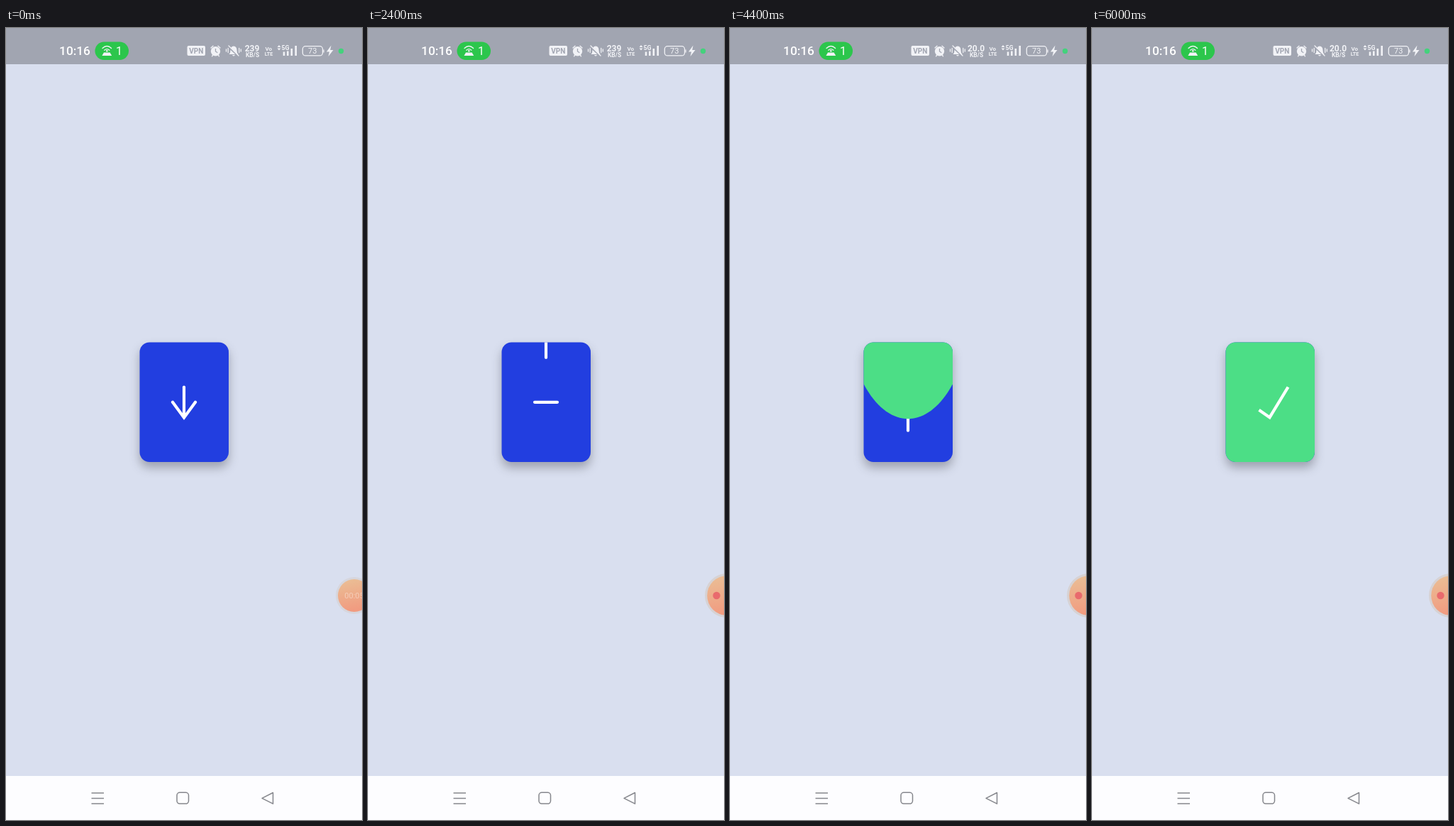
Recreate the animation shown at these times as an HTML page. Size 502 by 1115 pixels, loop 8000 ms.

```html
<!DOCTYPE html>
<html lang="en">
<head>
<meta charset="utf-8">
<title>Download button</title>
<style>
  html, body { margin: 0; width: 100%; height: 100%; overflow: hidden; background: #d9dfef; }
  svg { display: block; width: 100%; height: 100%; }
  text { font-family: Roboto, sans-serif; text-anchor: middle; }
  .line { fill: none; stroke: #fff; stroke-width: 4.2; }
  .status { fill: #f1f2f6; }
  .status .outline { fill: none; stroke: #f1f2f6; stroke-width: 1.3; stroke-linecap: round; }
  .nav { fill: none; stroke: #85868c; stroke-width: 1.5; stroke-linejoin: round; }
  #card { filter: drop-shadow(0 8px 7px rgba(30, 30, 40, .32)); }
</style>
</head>
<body>
<svg viewBox="0 0 502 1115" preserveAspectRatio="none">
  <defs>
    <clipPath id="cardClip"><rect x="188.5" y="442.5" width="125.5" height="168.5" rx="14"/></clipPath>
    <linearGradient id="peach" x1="0" y1="0" x2=".2" y2="1">
      <stop offset="0" stop-color="#eac096"/><stop offset="1" stop-color="#f19b80"/>
    </linearGradient>
  </defs>

  <rect width="502" height="1115" fill="#d9dfef"/>
  <rect width="502" height="51" fill="#a1a5b1"/>
  <rect y="1053" width="502" height="62" fill="#fdfdff"/>

  <g class="status">
    <text x="97" y="38.2" font-size="17.3" font-weight="500" fill="#fff">10:16</text>
    <rect x="125.5" y="19.5" width="47.5" height="25.5" rx="12.75" fill="#2cc64c"/>
    <path class="outline" d="M136 28.5Q142.300 22.500 148.600 28.500M138.800 31.200Q142.300 28 145.800 31.200" stroke-width="1.5"/>
    <circle cx="142.300" cy="32.300" r="1.300"/>
    <path d="M138 34.500h8.600l2.600 4.500h-13.800z"/>
    <text x="159.500" y="38" font-size="16" fill="#fff">1</text>

    <rect x="255.500" y="25" width="25.500" height="14" rx="2"/>
    <text x="268.300" y="35.600" font-size="10" font-weight="700" fill="#a1a5b1">VPN</text>

    <circle cx="295.500" cy="32.700" r="6.700"/>
    <path class="outline" d="M289 28l3-2.800M302 28l-3-2.800M291.500 38.500l-1 1.300M299.500 38.500l1 1.300" stroke-width="1.700"/>
    <path d="M295.500 29v4l2.800 1.800" fill="none" stroke="#a1a5b1" stroke-width="1.300"/>

    <path d="M314.500 37q2-1.500 2-5.500q0-5.500 4.500-6q4.500.5 4.500 6q0 4 2 5.500zM319 38h4q-2 3-4 0z"/>
    <path d="M313.500 26.500l14 13" stroke="#a1a5b1" stroke-width="2.200"/>
    <path class="outline" d="M314 25l14 14M310.500 30v3M313.200 28.500v6M328.700 28.500v6M331.300 30v3"/>

    <text id="speed" x="347" y="32.800" font-size="12" font-weight="700">239</text>
    <text x="347.500" y="41" font-size="8.500" font-weight="700">KB/S</text>
    <g font-size="8" font-weight="700">
      <text x="370.300" y="31.500">Vo</text>
      <text x="370.500" y="39.300" font-size="7.200">LTE</text>
      <text x="394" y="31.300" font-size="8.800">5G</text>
    </g>
    <path d="M382.500 27l2.500-3 2.500 3zM382.500 28.500h5l-2.500 3z"/>
    <path d="M392 33.500v5.500M397.300 32.500v6.500M402.800 29v10M408.700 25v14" stroke="#f1f2f6" stroke-width="2.600"/>
    <rect class="outline" x="418.300" y="25.700" width="28.200" height="13.200" rx="4"/>
    <path class="outline" d="M448 31v3"/>
    <text x="432.300" y="36.300" font-size="11">73</text>
    <path d="M458.500 24.500l-6.500 9h4l-1.500 6.500 7-9h-4.300z"/>
    <circle cx="472.500" cy="32.500" r="3.700" fill="#43d27c"/>
  </g>

  <g id="card">
    <rect x="188.500" y="442.500" width="125.500" height="168.500" rx="14" fill="#223ee0"/>
  </g>
  <g clip-path="url(#cardClip)">
    <path id="shaft" class="line" stroke-linecap="round"/>
    <path id="head" class="line" stroke-linecap="round" stroke-miterlimit="8"/>
    <path id="fill" fill="#4cde86"/>
    <path id="check" class="line" d="M235.500 537.700L250.500 548.200L276.500 505.500"/>
  </g>

  <g id="recorder">
    <circle id="ring" cy="799" fill="#d6d2d4"/>
    <circle id="disc" cy="799" fill="url(#peach)"/>
    <text id="timer" x="491" y="803" font-size="11" fill="#fff">00:05</text>
    <circle id="dot" cx="491.500" cy="799" r="5.200" fill="#e96a6d"/>
  </g>

  <g class="nav">
    <path d="M120.500 1077h17.500M120.500 1084.500h17.500M120.500 1092h17.500"/>
    <rect x="241" y="1076.300" width="16.500" height="15.800" rx="4"/>
    <path d="M361 1084.300L376.500 1076.500V1092.200Z"/>
  </g>
</svg>
<script>
const LOOP = 8000;
const el = Object.fromEntries([...document.querySelectorAll('[id]')].map(e => [e.id, e]));
const set = (node, attrs) => { for (const k in attrs) node.setAttribute(k, attrs[k]); };
const span = (t, from, to) => Math.min(1, Math.max(0, (t - from) / (to - from)));
const ease = u => u * u * (3 - 2 * u);
const mix = (a, b, u) => a + (b - a) * u;

// Piecewise linear value through [position, value] stops.
function along(stops, p) {
  const i = Math.max(1, stops.findIndex(s => s[0] >= p));
  const [a, b] = [stops[i - 1], stops[i]];
  return mix(a[1], b[1], span(p, a[0], b[0]));
}

// The liquid's rim and its lowest point as the download advances.
const RIM = [[0, 430], [.15, 443], [.3, 447], [.44, 460], [.6, 497], [.786, 551], [.87, 575], [1, 612]];
const BELLY = [[0, 441], [.15, 476], [.44, 518], [.6, 548], [.786, 584], [1, 626]];

function drawRecorder(t) {
  const u = ease(span(t, 100, 900));
  const cx = mix(491, 506, u);
  set(el.ring, { cx, r: mix(26, 31, u), opacity: mix(.65, 1, u) });
  set(el.disc, { cx, r: mix(23, 27.8, u) });
  set(el.timer, { opacity: .4 * (1 - span(t, 100, 400)) });
  set(el.dot, { opacity: span(t, 400, 900) });
}

function drawArrow(t, progress) {
  const lift = ease(span(t, 1600, 2200));
  const shift = -84 * lift + 168 * progress;
  set(el.shaft, { d: `M251 ${505.5 + shift}V${548 + shift}` });
  el.shaft.style.display = progress < 1 ? '' : 'none';

  const half = 16 * (1 - ease(span(t, 2400, 2900)));
  set(el.head, { d: `M${251 - half} 526.800L251 ${mix(548.5, 526.8, lift)}L${251 + half} 526.800` });
  el.head.style.display = half > 0 ? '' : 'none';
}

function drawLiquid(progress) {
  const rim = along(RIM, progress);
  const pull = rim + (along(BELLY, progress) - rim) / .75;
  set(el.fill, { d: `M188 400V${rim}C223 ${pull} 279 ${pull} 314.500 ${rim}V400Z` });
  el.fill.style.display = progress > 0 ? '' : 'none';
}

function draw(now) {
  const t = now % LOOP;
  const progress = span(t, 2940, 5330);
  drawRecorder(t);
  drawArrow(t, progress);
  drawLiquid(progress);
  el.check.style.display = t >= 5800 ? '' : 'none';
  el.speed.textContent = t < 4200 ? '239' : '20.0';
}

const start = performance.now();
function tick() {
  draw(performance.now() - start);
  requestAnimationFrame(tick);
}
tick();
</script>
</body>
</html>
```
